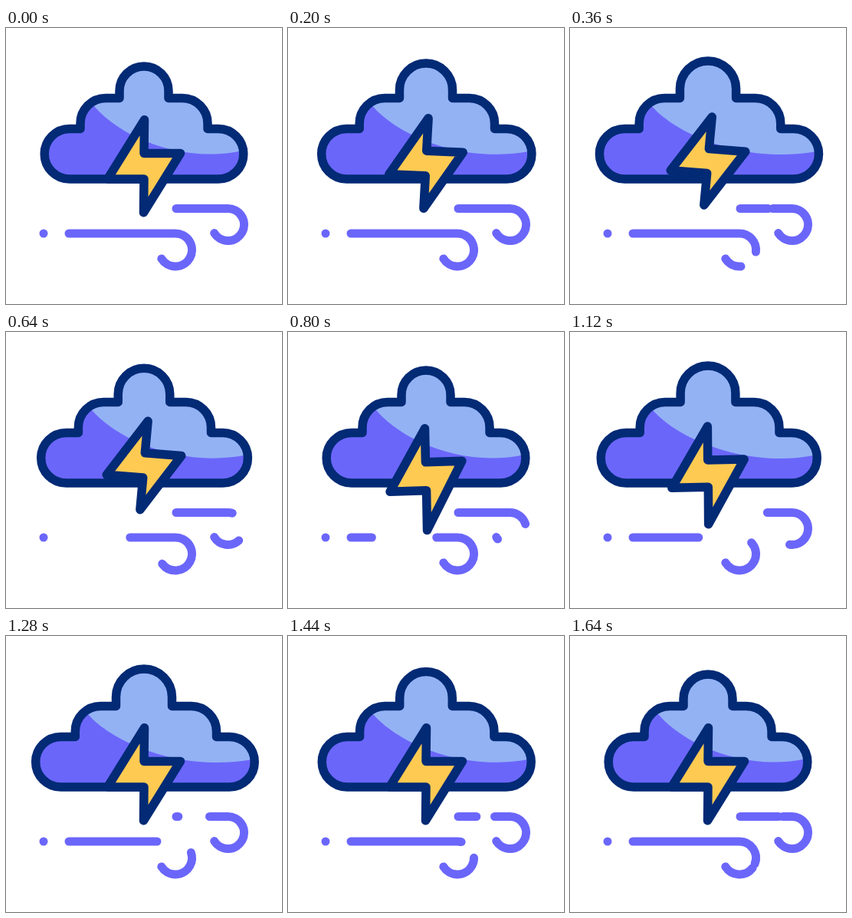
An HTML page that plays this animation: 360 by 360 pixels, repeating every 1680 ms.

```html
<!DOCTYPE html>
<html lang="en">
<head>
<meta charset="utf-8">
<title>Thunderstorm</title>
<style>
  html, body { margin: 0; width: 100%; height: 100%; overflow: hidden; background: #fff; }
  svg { display: block; width: 100vw; height: 100vh; }
  .line { fill: none; stroke: #022a75; stroke-width: 11.5; stroke-linejoin: round; }
  .wind { fill: none; stroke: #6b66fa; stroke-width: 11; stroke-linecap: round; }
  #bolt { fill: #ffca52; }
</style>
</head>
<body>
<svg viewBox="0 0 360 360">
  <defs><clipPath id="clip"><path class="cloud"/></clipPath></defs>
  <path class="cloud" fill="#6b66fa"/>
  <path id="light" fill="#93b2f4" clip-path="url(#clip)"/>
  <path class="cloud line"/>
  <path id="bolt" class="line"/>
  <circle cx="49" cy="268" r="5.5" fill="#6b66fa"/>
  <path id="long" class="wind" pathLength="1" d="M82 268H221A21.5 21.5 0 1 1 202.8 300.9"/>
  <path id="short" class="wind" pathLength="1" d="M222 235.5H289.5A21 21 0 1 1 271.7 267.6"/>
</svg>
<script>
const LOOP = 1680, STEP = 40, BEAT = 833;
const $ = id => document.getElementById(id);
const clouds = document.querySelectorAll('.cloud');
const mix = (a, b, k) => a + (b - a) * k;
const ease = x => (x = Math.min(1, Math.max(0, x)), x * x * (3 - 2 * x));
const wrap = x => x - Math.floor(x);

// The cloud swells once per beat; only the outline's anchors move
function drawCloud(t) {
  const p = t % BEAT / (BEAT / 2);
  const k = ease(p < 1 ? p : 2 - p);
  const l = mix(83, 71, k), l2 = mix(97, 90, k), r = mix(277, 292, k), r2 = mix(263, 275, k);
  const top = mix(32, 36.7, k), y = mix(82, 79.5, k);
  const d = `M${l} 197A32.8 32.8 0 0 1 ${l} 131.4H${l2}V124.5A33 33 0 0 1 ${l2 + 33} 91.5H${180 - top}V${y}` +
    `A${top} ${top} 0 0 1 ${180 + top} ${y}V91.5H${r2 - 33}A33 33 0 0 1 ${r2} 124.5V131.4H${r}A32.8 32.8 0 0 1 ${r} 197Z`;
  clouds.forEach(c => c.setAttribute('d', d));
  const a = mix(111, 105, k), b = mix(309, 322, k);
  $('light').setAttribute('d', `M${a - 14} 72L${a} ${mix(97, 100, k)}` +
    `C${a + 32} 139 ${mix(225, 230, k)} 178 ${b} ${mix(160, 161, k)}L${b + 20} 156V20H${a - 14}Z`);
}

// Half of the bolt (tip, notch, corner); the other half is its point reflection
const HALF = [[0.5, -60.5], [0, -16.8], [47.5, -16.8]];
const REST = { y: 180.2, turn: 0, stretch: 1, tips: 0 };
const UP = { y: 173.4, turn: 0.08, stretch: 0.95, tips: 0 };
const DOWN = { y: 188.4, turn: -0.035, stretch: 1.1, tips: 4 };

function drawBolt(t) {
  const up = ease(t / 417), down = ease((t - 640) / 193), back = ease((t - 1042) / 208);
  const pose = key => mix(mix(mix(REST[key], UP[key], up), DOWN[key], down), REST[key], back);
  const y0 = pose('y'), turn = pose('turn'), stretch = pose('stretch'), tips = pose('tips');
  const side = sign => HALF.map(([x, y], i) => [
    180 + sign * (x - turn * y),
    y0 + sign * (y * stretch + turn * x) + (i ? 0 : tips)
  ]);
  $('bolt').setAttribute('d', `M${[...side(1), ...side(-1)].join(' ')}Z`);
}

// A cut runs along the line at constant speed while its gap opens and closes
function drawWind(el, t, from, speed, start) {
  const gap = 0.37 * ease((t - start) / 565) * ease((1790 - t) / (1036 - start));
  const head = from + speed * t;
  const e = wrap(head), s = wrap(head + gap);
  const split = s >= e;
  el.style.strokeDasharray = gap < 0.001 ? 'none' : split ? `${e} ${s - e} ${1 - s} 9` : `${e - s} 9`;
  el.style.strokeDashoffset = split ? 0 : -s;
}

function frame() {
  let t = Math.floor(performance.now() % LOOP / STEP) * STEP;
  if (t < 2 * STEP) t = 0;
  const beat = t && t + 20;
  drawCloud(beat);
  drawBolt(beat);
  drawWind($('long'), t, 0.48, 0.0008, 136);
  drawWind($('short'), t, -0.07, 0.00085, 246);
  requestAnimationFrame(frame);
}
frame();
</script>
</body>
</html>
```
